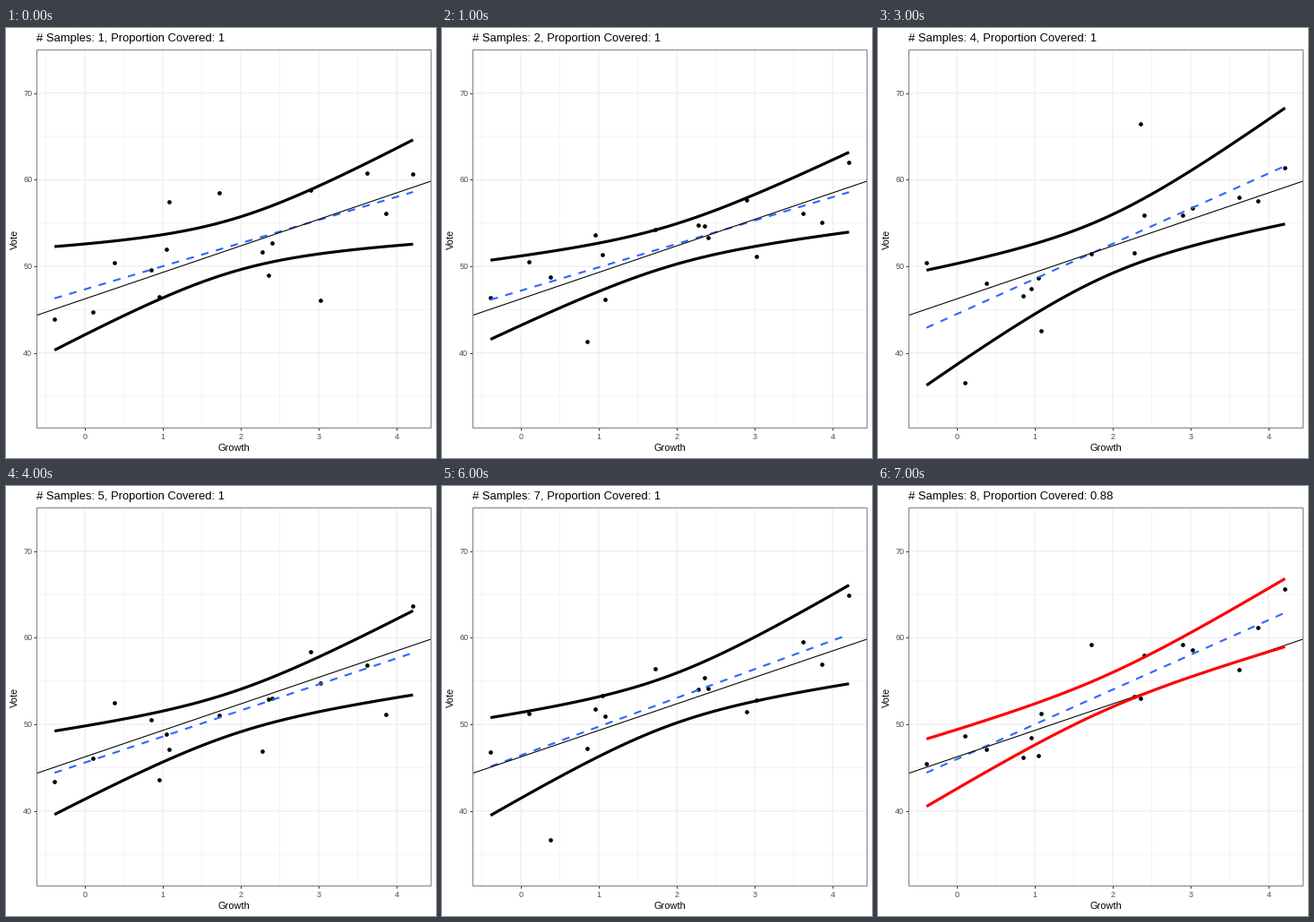
Write a matplotlib script that moves like this. It is 480 by 480 pixels and loops after 8000 ms.

```python
import numpy as np
import matplotlib.pyplot as plt
from matplotlib.animation import FuncAnimation
from matplotlib.patches import Rectangle

SIZE, DPI = 480, 96
PT = 72 / DPI  # points per pixel
LEFT, RIGHT, TOP, BOTTOM = 34, 474, 24, 446
TRUE_A, TRUE_B = 46.25, 3.06
BAND = np.sqrt(2 * 3.7389)  # simultaneous 95% band, F(2, 14)

growth = np.array([-.39, .10, .38, .85, .95, 1.04, 1.08, 1.72,
                   2.27, 2.36, 2.40, 2.89, 3.02, 3.62, 3.86, 4.21])
grid = np.linspace(growth[0], growth[-1], 80)
centre = growth.mean()
spread = ((growth - centre) ** 2).sum()

# intercept, slope and residual deviation of each sample's fit
fits = [(47.35, 2.669, 4.446), (47.2, 2.7, 3.4),
        (46.50, 2.540, 4.267), (44.50, 4.059, 4.943),
        (45.59, 3.009, 3.585), (44.4, 3.5, 4.0),
        (46.43, 3.314, 4.200), (45.99, 4.015, 2.898)]


def px(x):
    return 88.1 + 87 * np.asarray(x)


def py(y):
    return 749.6 - 9.67 * np.asarray(y)


def simulate(seed, a, b, sd):
    """Votes whose least squares fit is a + b * growth with residual sd."""
    noise = np.random.default_rng(seed).normal(size=growth.size)
    noise -= np.polyval(np.polyfit(growth, noise, 1), growth)
    noise *= sd / np.sqrt((noise ** 2).sum() / (growth.size - 2))
    return a + b * growth + noise


def fit_band(a, b, sd):
    fit = a + b * grid
    half = BAND * sd * np.sqrt(1 / growth.size + (grid - centre) ** 2 / spread)
    covered = np.all(np.abs(TRUE_A + TRUE_B * grid - fit) <= half)
    return fit, half, covered


samples = [simulate(i, *f) for i, f in enumerate(fits)]
bands = [fit_band(*f) for f in fits]
covers = np.array([b[2] for b in bands])

plt.rcParams["font.family"] = "Liberation Sans"
fig = plt.figure(figsize=(SIZE / DPI, SIZE / DPI), dpi=DPI, facecolor="white")
ax = fig.add_axes([0, 0, 1, 1])
ax.set(xlim=(0, SIZE), ylim=(SIZE, 0))
ax.axis("off")


def line(xs, ys, color, width, z, **kw):
    return ax.plot(xs, ys, color=color, lw=width * PT, zorder=z,
                   solid_capstyle="butt", dash_capstyle="butt", **kw)[0]


def label(x, y, text, size, color="black", **kw):
    return ax.text(x, y, text, fontsize=size * PT, color=color, **kw)


def gridline(xs, ys, major):
    line(xs, ys, "#ebebeb", 1.07 if major else .53, 1, snap=False)


for v in np.arange(-.5, 4.6, .5):
    major = v == int(v)
    gridline([px(v)] * 2, [TOP, BOTTOM], major)
    if major:
        line([px(v)] * 2, [BOTTOM, BOTTOM + 3], "#333333", 1, 2)
        label(px(v), 459.2, f"{v:.0f}", 9, "#4d4d4d", ha="center")
for v in range(35, 75, 5):
    major = v % 10 == 0
    gridline([LEFT, RIGHT], [py(v)] * 2, major)
    if major:
        line([LEFT - 3, LEFT], [py(v)] * 2, "#333333", 1, 2)
        label(29.3, py(v) + 2.9, f"{v}", 9, "#4d4d4d", ha="right")

ax.add_patch(Rectangle((LEFT, TOP), RIGHT - LEFT, BOTTOM - TOP, fill=False,
                       ec="#7f7f7f", lw=PT, zorder=8))
label(254, 472, "Growth", 11, ha="center")
label(13, 235.5, "Vote", 11, ha="center", va="baseline",
      rotation=90, rotation_mode="anchor")
title = label(34, 15, "", 13)

ends = np.array([LEFT, RIGHT])
line(ends, py(TRUE_A + TRUE_B * (ends - px(0)) / 87), "black", 1.07, 5)
dots = ax.plot([], [], "o", color="black", ms=4.7 * PT, mew=0, zorder=3)[0]
trend = line([], [], "#3366ff", 2.134, 4, dashes=(4, 4))
edges = [line([], [], "black", 3.2, 6) for _ in range(2)]


def draw(i):
    fit, half, covered = bands[i]
    dots.set_data(px(growth), py(samples[i]))
    trend.set_data(px(grid), py(fit))
    for edge, sign in zip(edges, (-1, 1)):
        edge.set_data(px(grid), py(fit + sign * half))
        edge.set_color("black" if covered else "red")
    share = round(float(covers[:i + 1].mean()), 2)
    title.set_text(f"# Samples: {i + 1}, Proportion Covered: {share:g}")
    return [dots, trend, title, *edges]


anim = FuncAnimation(fig, draw, frames=len(samples), interval=1000,
                     repeat=True, repeat_delay=0)
plt.show()
```
